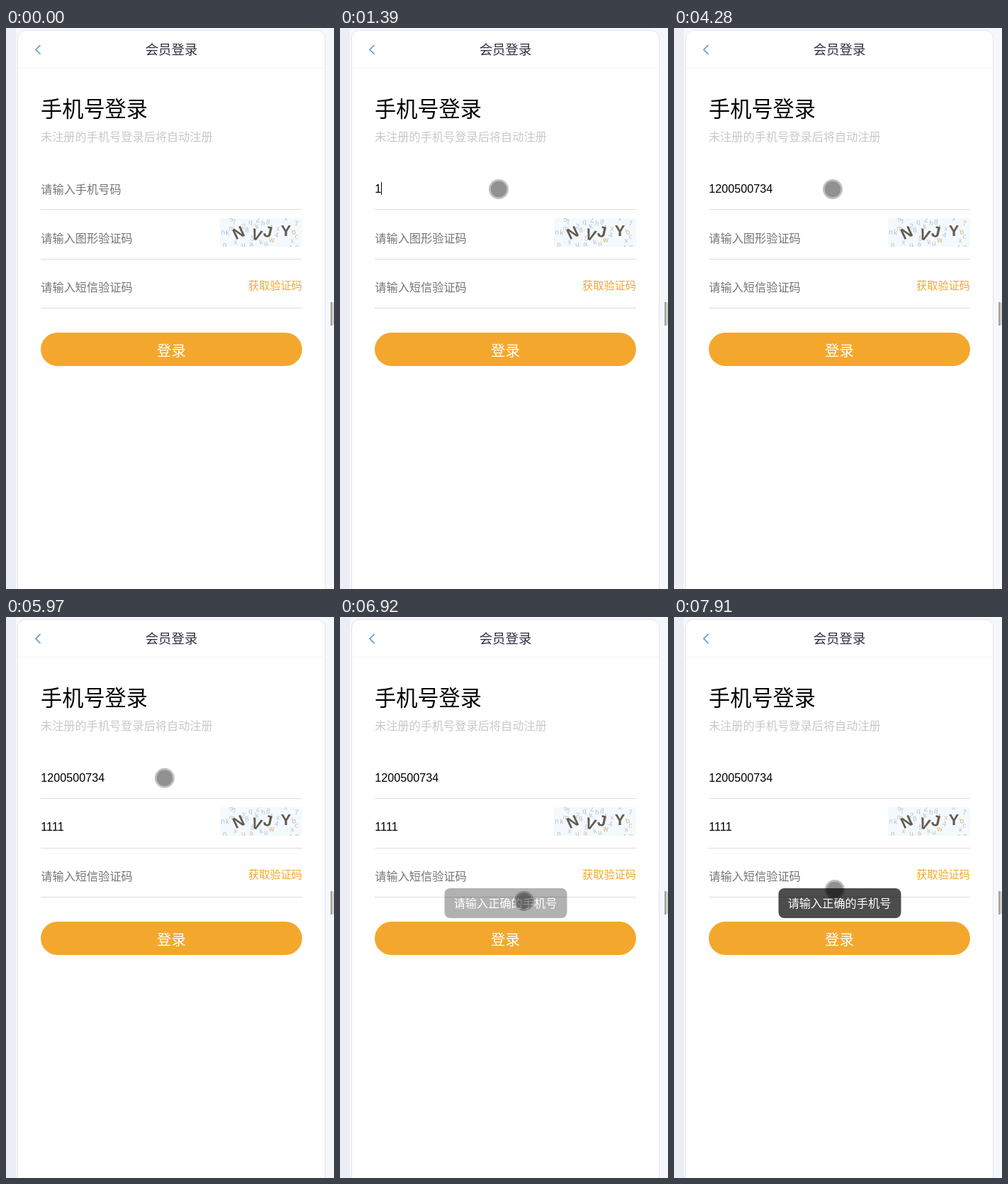
Animation, 463 px wide and 790 px high, one loop 8000 ms. Source, as an HTML page:

```html
<!DOCTYPE html>
<html lang="zh-CN">
<head>
<meta charset="utf-8">
<title>会员登录</title>
<style>
html, body { margin: 0; width: 100%; height: 100%; overflow: hidden; background: #f5f7fb; }
svg { display: block; }
text { font: 16.2px "Noto Sans CJK SC", "Noto Sans CJK", "Noto Sans SC", sans-serif; fill: #757575; }
.typed { font-family: "Liberation Sans", Arial, sans-serif; fill: #000; }
.code { font: 10px "Liberation Sans", sans-serif; }
.big { font: bold 22px "Liberation Sans", sans-serif; fill: #625b50; }
</style>
</head>
<body>
<svg width="463" height="790" viewBox="0 0 463 790">
  <rect width="14" height="790" fill="#ebeff5"/>
  <rect x="14" width="449" height="790" fill="#f5f7fb"/>
  <rect x="16.5" y="3.5" width="434" height="820" rx="11" fill="#fff" stroke="#e1e6ec"/>
  <path d="M17 56.5H450" stroke="#f2f3f5"/>
  <path d="M48.5 24L42 30.5L48.5 37" fill="none" stroke="#5b9bcd" stroke-width="1.7"/>
  <path d="M459.5 386V419" stroke="#a9aa9f" stroke-width="3"/>
  <path d="M462.5 387V418" stroke="#b9bab2"/>

  <text x="233.5" y="37.4" text-anchor="middle" style="font-size:18.4px;fill:#2c3040">会员登录</text>
  <text x="49" y="125" style="font-size:30.2px;fill:#000">手机号登录</text>
  <text x="49" y="159.3" style="fill:#c8c8c8">未注册的手机号登录后将自动注册</text>
  <path d="M49 255.5H418M49 325.5H418M49 394.5H418" stroke="#dcdcdc"/>

  <text id="hint1" x="49.3" y="232.5">请输入手机号码</text>
  <text id="hint2" x="49.3" y="301.5">请输入图形验证码</text>
  <text x="49.3" y="370.6">请输入短信验证码</text>
  <text id="field1" class="typed" x="49.3" y="232"></text>
  <text id="field2" class="typed" x="49.3" y="301"></text>
  <rect id="caret" width="1" height="18"/>

  <text x="418" y="368.2" text-anchor="end" style="font-size:15.2px;fill:#f2a72b">获取验证码</text>
  <clipPath id="clip"><rect x="302" y="268" width="116" height="40"/></clipPath>
  <g clip-path="url(#clip)">
    <rect x="302" y="268" width="116" height="40" fill="#f3f9fd"/>
    <g id="noise"></g>
  </g>

  <rect x="49" y="429" width="369" height="47" rx="23.5" fill="#f3a82d"/>
  <text x="233.5" y="462" text-anchor="middle" style="font-size:20.5px;fill:#fff">登录</text>

  <g id="toast">
    <rect x="147.5" y="382" width="173" height="42" rx="8" fill="#000" fill-opacity=".7"/>
    <text x="233.5" y="408.6" text-anchor="middle" style="fill:#fff;font-weight:500">请输入正确的手机号</text>
  </g>
  <g id="touch">
    <circle r="14" fill-opacity=".25"/>
    <circle r="11.3" fill-opacity=".24"/>
  </g>
</svg>
<script>
const LOOP = 8000;
const $ = id => document.getElementById(id);
const [hint1, hint2, field1, field2, caret, toast, touch, noise] =
  ["hint1", "hint2", "field1", "field2", "caret", "toast", "touch", "noise"].map($);

// Verification image: faint characters, then the four large letters
function glyph(char, x, y, turn, cls, color) {
  const el = document.createElementNS("http://www.w3.org/2000/svg", "text");
  el.textContent = char;
  el.setAttribute("class", cls);
  el.setAttribute("text-anchor", "middle");
  el.setAttribute("transform", `translate(${x} ${y}) rotate(${turn}) translate(0 ${cls === "big" ? 8 : 3.5})`);
  if (color) el.style.fill = color;
  noise.append(el);
}
const tints = ["#b9bfc4", "#c6c2bb", "#b3c3d0"];
("5 318 269,7 322 273,n 306 287,k 313 288,m 319 282,2 335 279,8 340 284,q 345 273,Z 356 270,h 363 275," +
 "8 370 273,k 354 279,t 375 280,x 384 282,4 382 291,5 348 296,k 360 301,u 367 303,w 375 298,x 324 301," +
 "n 309 305,u 335 305,a 346 304,x 395 268,7 410 275,c 410 293,b 406 287,x 404 299,n 411 308,r 402 308")
  .split(",").forEach((item, i) => {
    const [char, x, y] = item.split(" ");
    glyph(char, x, y, (i * 37) % 31 - 15, "code", "wb".includes(char) ? "#e0b070" : tints[i % 3]);
  });
glyph("N", 328, 288, -25, "big");
glyph("V", 354, 291, 18, "big");
glyph("J", 370, 286.5, 12, "big");
glyph("Y", 395, 285, 0, "big");

const phone = "1200500734", code = "1111";
const phoneKeys = [1390, 1580, 1760, 1960, 2210, 2830, 3140, 3340, 3590, 3780];
const codeKeys = [4910, 5090, 5280, 5410];
const focus1 = 710, focus2 = 4590, blur = 6760;

// Pointer path: time, x, y
const path = [
  [130, 443, 731], [200, 397, 563], [260, 325, 400], [330, 260, 285], [400, 230, 236], [460, 224, 227],
  [5970, 224, 227], [6100, 208, 200], [6280, 228, 232], [6420, 270, 287], [6560, 325, 350],
  [6660, 350, 364], [6790, 354, 367], [6920, 260, 400], [7050, 236, 388], [7240, 228, 383],
  [7490, 228, 383], [7550, 227, 383], [7910, 227, 384]
];

function pointAt(t) {
  const i = path.findIndex(p => p[0] > t);
  if (i < 0) return path[path.length - 1].slice(1);
  const [t0, x0, y0] = path[i - 1], [t1, x1, y1] = path[i];
  const k = (t - t0) / (t1 - t0);
  return [x0 + (x1 - x0) * k, y0 + (y1 - y0) * k];
}

function type(field, hint, value, keys, t) {
  const count = keys.filter(k => k <= t).length;
  const shown = value.slice(0, count);
  if (field.textContent !== shown) field.textContent = shown;
  hint.style.display = count ? "none" : "";
}

function drawCaret(t) {
  const second = t >= focus2;
  const field = second ? field2 : field1;
  const last = Math.max(...[focus1, focus2, ...phoneKeys, ...codeKeys].filter(k => k <= t));
  const on = t >= focus1 && t < blur && Math.floor((t - last) / 500) % 2 === 0;
  caret.style.display = on ? "" : "none";
  if (!on) return;
  const width = field.textContent ? field.getComputedTextLength() : 0;
  caret.setAttribute("x", Math.round(49 + width));
  caret.setAttribute("y", second ? 286 : 217);
}

function draw(now) {
  const t = now % LOOP;
  type(field1, hint1, phone, phoneKeys, t);
  type(field2, hint2, code, codeKeys, t);
  drawCaret(t);
  toast.style.opacity = Math.min(1, Math.max(0, (t - 6790) / 300));
  touch.style.display = t < path[0][0] ? "none" : "";
  if (t >= path[0][0]) touch.setAttribute("transform", `translate(${pointAt(t)})`);
}

const start = performance.now();
function frame() {
  draw(performance.now() - start);
  requestAnimationFrame(frame);
}
frame();
</script>
</body>
</html>
```
